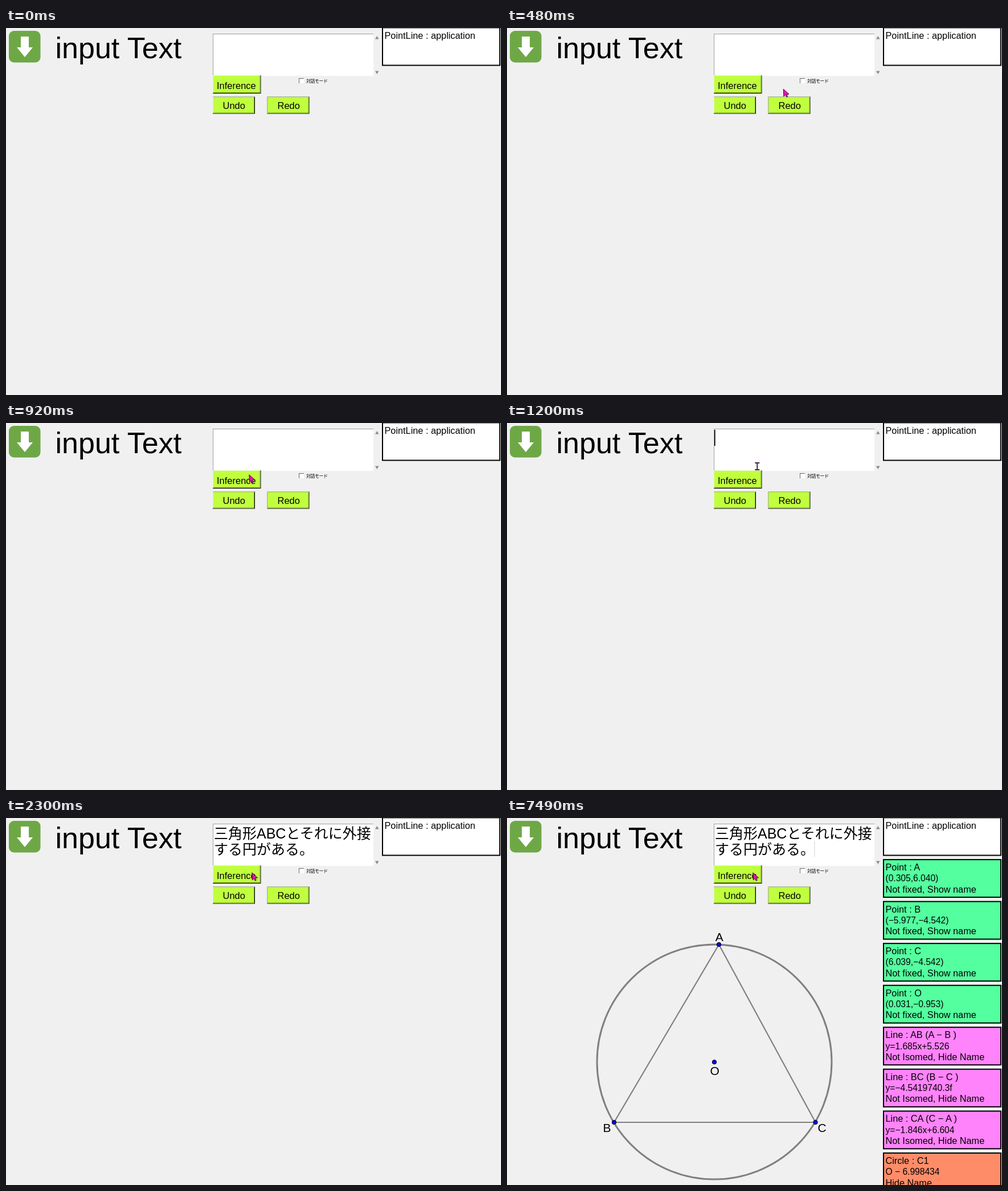
These frames come from a looping animation (869x644 px, 8000 ms). An HTML page:

```html
<!DOCTYPE html>
<html lang="ja">
<head>
<meta charset="utf-8">
<title>PointLine</title>
<style>
html, body { margin: 0; width: 100%; height: 100%; overflow: hidden; background: #f0f0f0; }
svg { display: block; width: 869px; height: 644px; }
text { font-family: "Liberation Sans", "Noto Sans CJK JP", "Noto Sans CJK", sans-serif; white-space: pre; }
</style>
</head>
<body>
<svg id="stage" viewBox="0 0 869 644"></svg>
<script>
const LOOP = 8000;
const PASTE = 1570, PRESS = 2530, RESULT = 7490;

const rect = (x, y, w, h, fill, extra = '') =>
  `<rect x="${x}" y="${y}" width="${w}" height="${h}" fill="${fill}" ${extra}/>`;
const path = (d, fill, extra = '') => `<path d="${d}" fill="${fill}" ${extra}/>`;
const text = (x, y, size, str, extra = '') =>
  `<text x="${x}" y="${y}" font-size="${size}" ${extra}>${str}</text>`;
const group = (id, body) => `<g id="${id}">${body}</g>`;

function button(x, y, w, h, label, tx) {
  return rect(x, y, w, h, '#000') +
    rect(x, y, w - 1, h - 1, '#e4f5bd') +
    rect(x + 1, y + 1, w - 2, h - 2, '#78a028') +
    rect(x + 1, y + 1, w - 3, h - 3, '#c0ff3e') +
    text(tx, y + h - 8.5, 16.5, label);
}

function pressedButton(x, y, w, h, label, tx) {
  return rect(x, y, w, h, '#fff') +
    rect(x, y, w - 1, h - 1, '#696969') +
    rect(x + 1, y + 1, w - 2, h - 2, '#f0f0f0') +
    text(tx, y + h - 7.5, 16.5, label);
}

// Number lines are set a little smaller than the labels.
function card(i, fill, lines) {
  const top = -1.5 + 73.55 * i;
  return rect(661, top + 1, 206, 66, fill, 'stroke="#000" stroke-width="2"') +
    lines.map((s, k) => text(664.5, top + 20 + k * 19.3, k === 1 ? 15.6 : 16.3, s)).join('');
}

function results() {
  const green = '#54ff9f', pink = '#ff83fa', salmon = '#ff8c69';
  const points = [
    ['A', '(0.305,6.040)', 372, 222, 365.7, 216],
    ['B', '(−5.977,−4.542)', 188, 534, 168.5, 551],
    ['C', '(6.039,−4.542)', 541.5, 534, 545.5, 551],
    ['O', '(0.031,−0.953)', 364, 428.3, 356.5, 451]
  ];
  const lines = [
    ['AB (A − B )', 'y=1.685x+5.526'],
    ['BC (B − C )', 'y=−4.5419740.3f'],
    ['CA (C − A )', 'y=−1.846x+6.604']
  ];
  const grey = 'stroke="#808080" stroke-width=';
  let out = `<circle cx="364" cy="428" r="206" fill="none" ${grey}"3"/>` +
    path('M372 222L188 534H541.5Z', 'none', grey + '"2.2"');
  points.forEach(([name, pos, x, y, tx, ty], i) => {
    out += `<circle cx="${x}" cy="${y}" r="3.7" fill="#0000ff" stroke="#000"/>` +
      text(tx, ty, 21, name) +
      card(i + 1, green, ['Point : ' + name, pos, 'Not fixed, Show name']);
  });
  lines.forEach(([name, eq], i) => {
    out += card(i + 5, pink, ['Line : ' + name, eq, 'Not Isomed, Hide Name']);
  });
  return out + card(8, salmon, ['Circle : C1', 'O − 6.998434', 'Hide Name']);
}

const stage = document.getElementById('stage');
stage.innerHTML =
  rect(0, 0, 869, 644, '#f0f0f0') +
  rect(5, 5, 55.5, 55.5, '#6ea846', 'rx="9"') +
  path('M26 15H40V34H47L33 51L19 34H26Z', '#fff') +
  text(86.5, 52.5, 52, 'input Text') +
  // input box with its scroll arrows
  rect(363, 10, 282, 74, '#a0a0a0') +
  rect(364, 11, 281, 73, '#fff') +
  path('M648 19.5L651.3 14L654.6 19.5Z M648 75.5L651.3 81L654.6 75.5Z', '#8c8c8c') +
  group('typed', text(365, 35.5, 25, '三角形ABCとそれに外接') + text(365, 63.5, 25, 'する円がある。')) +
  rect(364, 12, 1.6, 28, '#000', 'id="caret"') +
  group('up', button(363, 83, 84.5, 32, 'Inference', 370)) +
  group('down', pressedButton(363, 84, 83.5, 31, 'Inference', 371)) +
  button(363, 120.5, 74, 30, 'Undo', 380.5) +
  button(458.5, 120.5, 74, 30, 'Redo', 476.5) +
  rect(514, 88, 9, 9, '#696969') +
  rect(515, 89, 8, 8, '#fff') +
  text(527, 96, 8, '対話モード', 'letter-spacing="-.5"') +
  card(0, '#fff', ['PointLine : application']) +
  group('results', results()) +
  group('arrow', path('M0 0L.6 13L3.4 10.2L5.6 14.2L7.6 13L5.6 9.4L9.8 9Z', '#ec12b4',
    'stroke="#401038" stroke-width="1"')) +
  group('beam', path('M-4 -6H4M0 -6V6M-4 6H4', 'none', 'stroke="#4a2048" stroke-width="2"'));

const el = {};
for (const id of ['typed', 'caret', 'up', 'down', 'results', 'arrow', 'beam'])
  el[id] = document.getElementById(id);
const show = (node, on) => node.setAttribute('visibility', on ? 'visible' : 'hidden');

// Pointer stops: time, x, y
const stops = [
  [60, 841, 632], [480, 485.8, 107.5], [620, 447, 82], [790, 426.8, 91],
  [920, 426.8, 91], [1130, 439.3, 76], [2059, 439.3, 76], [2060, 439.3, 80],
  [2300, 431.8, 96]
];

function pointer(t) {
  const i = stops.findIndex(s => s[0] > t);
  if (i < 0) return stops[stops.length - 1].slice(1);
  const a = stops[Math.max(i - 1, 0)], b = stops[i];
  const p = Math.max(0, (t - a[0]) / (b[0] - a[0]));
  const e = 1 - (1 - p) * (1 - p);
  return [a[1] + (b[1] - a[1]) * e, a[2] + (b[2] - a[2]) * e];
}

function draw(t) {
  const [x, y] = pointer(t);
  const beam = y < 84;
  const at = `translate(${x} ${y})`;
  el.arrow.setAttribute('transform', at);
  el.beam.setAttribute('transform', at);
  show(el.arrow, t >= 60 && !beam);
  show(el.beam, t >= 60 && beam);

  const typed = t >= PASTE, done = t >= RESULT;
  const pressed = t >= PRESS && !done;
  show(el.typed, typed);
  show(el.caret, t >= 1200 && !(t >= 2170 && t < 2460));
  el.caret.setAttribute('x', typed ? 539 : 364);
  el.caret.setAttribute('y', typed ? 40 : 12);
  el.caret.setAttribute('fill', done ? '#e2e2e2' : '#000');
  show(el.up, !pressed);
  show(el.down, pressed);
  show(el.results, done);
}

const start = performance.now();
function tick() {
  draw((performance.now() - start) % LOOP);
  requestAnimationFrame(tick);
}
tick();
</script>
</body>
</html>
```
